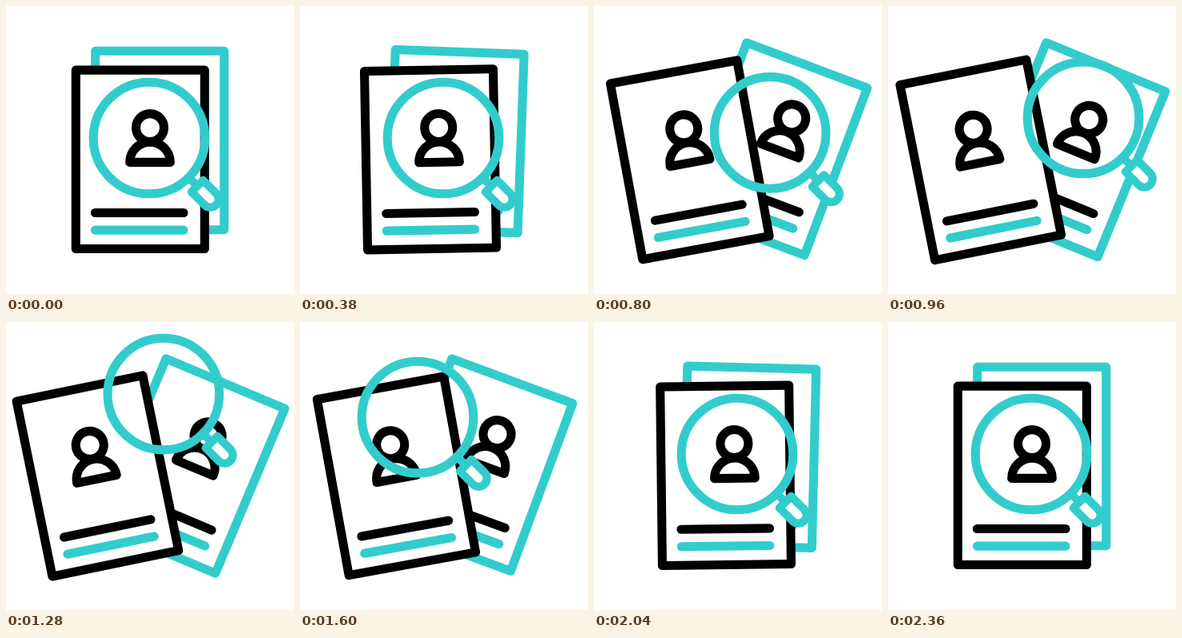
An HTML page for the animation above (2.4 s loop, 360x360 px).

```html
<!DOCTYPE html>
<html lang="en">
<head>
<meta charset="utf-8">
<title>Document search</title>
<style>
  html, body { margin: 0; width: 100%; height: 100%; overflow: hidden; background: #fff; }
  svg { display: block; width: 100%; height: 100%; fill: none; stroke-width: 11.1; stroke-linecap: round; stroke-linejoin: round; }
  .dark { stroke: #000; }
  .teal { stroke: #3cc; }
  .page { fill: #fff; }
  .grip { stroke-width: 10.2; }
</style>
</head>
<body>
<svg viewBox="0 0 360 360">
  <defs>
    <rect id="sheet" x="-80.5" y="-111.7" width="161" height="223.4"/>
    <g id="person">
      <circle r="17.5"/>
      <path d="M-25.3 43.3a25.3 25.3 0 0 1 50.6 0z"/>
    </g>
    <g id="lines">
      <path class="dark" d="M-56.4 66.7H54.2"/>
      <path class="teal" d="M-56.4 88.3H54.2"/>
    </g>
  </defs>
  <g id="back">
    <use href="#sheet" class="teal page"/>
    <use href="#person" class="dark" x="5.4" y="-43"/>
    <use href="#lines" x="1" y="-3"/>
  </g>
  <g id="front">
    <use href="#sheet" class="dark page"/>
    <use href="#person" class="dark" id="face"/>
    <use href="#lines"/>
  </g>
  <g id="glass" class="teal">
    <circle r="69.8"/>
    <g class="grip" transform="rotate(45)">
      <path d="M71 0H85" stroke-linecap="butt"/>
      <path class="page" d="M85 -10.3H108a10.3 10.3 0 0 1 0 20.6H85z"/>
    </g>
  </g>
</svg>
<script>
  const LOOP = 2400, OPEN_END = 1200, CLOSE_END = 2360;
  const [back, front, face, glass] =
    ['back', 'front', 'face', 'glass'].map(id => document.getElementById(id));

  // Time, x, y of the lens centre.
  const stops = [
    [0, 179, 165], [500, 179, 165], [640, 188, 170], [960, 244, 140],
    [1210, 213, 89], [1280, 197, 90], [1600, 147, 119], [1980, 179, 165], [LOOP, 179, 165]
  ];

  // cubic-bezier(.8, 0, .2, 1)
  function ease(x) {
    if (x <= 0) return 0;
    if (x >= 1) return 1;
    let lo = 0, hi = 1;
    for (let i = 0; i < 24; i++) {
      const s = (lo + hi) / 2, r = 1 - s;
      if (2.4 * s * r * r + 0.6 * s * s * r + s * s * s < x) lo = s;
      else hi = s;
    }
    return lo * lo * (3 - 2 * lo);
  }

  const same = (a, b) => a[1] === b[1] && a[2] === b[2];

  function speed(i, axis) {
    const a = stops[i - 1], b = stops[i], c = stops[i + 1];
    if (!a || !c || same(a, b) || same(b, c)) return 0;
    return (c[axis] - a[axis]) / (c[0] - a[0]);
  }

  function lensAt(t, axis) {
    const i = stops.findIndex(s => s[0] > t) - 1;
    const a = stops[i], b = stops[i + 1], span = b[0] - a[0];
    const s = (t - a[0]) / span, r = 1 - s;
    return a[axis] * r * r * (1 + 2 * s) + b[axis] * s * s * (3 - 2 * s)
      + span * s * r * (speed(i, axis) * r - speed(i + 1, axis) * s);
  }

  function place(el, x, y, turn = 0) {
    el.setAttribute('transform', `translate(${x} ${y}) rotate(${turn})`);
  }

  function draw(t) {
    const p = t < OPEN_END
      ? ease(t / OPEN_END)
      : 1 - ease((t - OPEN_END) / (CLOSE_END - OPEN_END));
    place(back, 192.2 + 38.8 * p, 168 + 12 * p, 22.9 * p);
    place(front, 167.8 - 53.5 * p, 191.8 + 0.6 * p, -11.6 * p);
    place(face, 12.2 - 14 * p, -39.7);
    place(glass, lensAt(t, 1), lensAt(t, 2));
  }

  const start = performance.now();
  function tick() {
    draw((performance.now() - start) % LOOP);
    requestAnimationFrame(tick);
  }
  tick();
</script>
</body>
</html>
```
